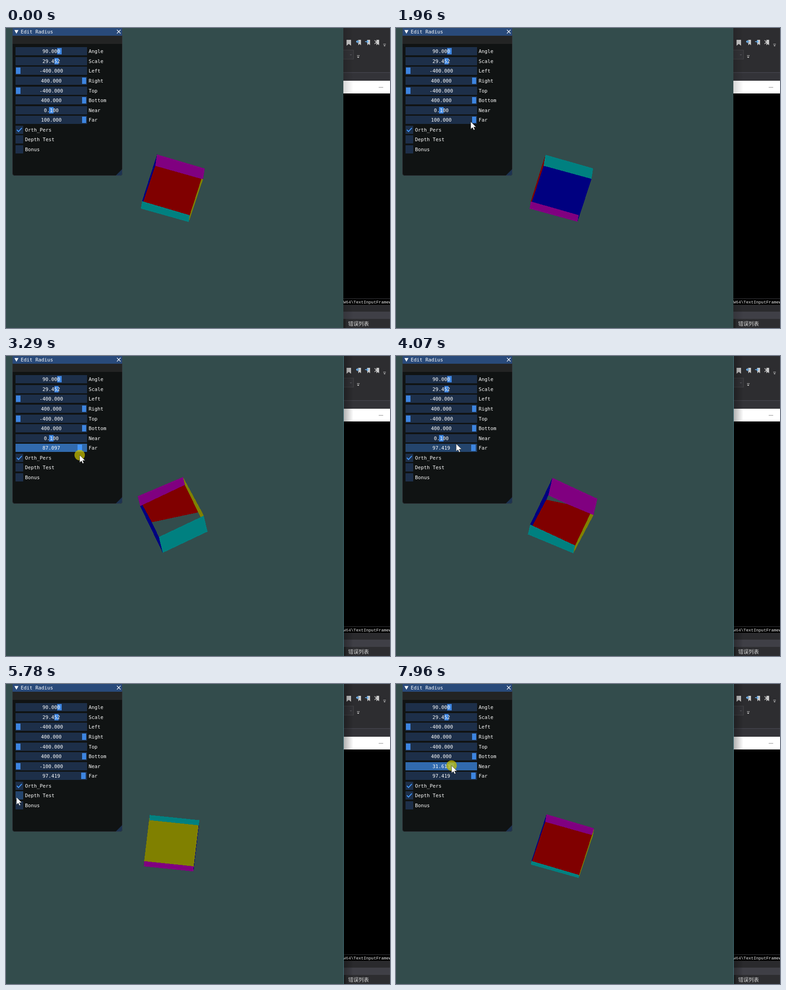
An HTML page for the animation above (8000 ms loop, 848 by 660 pixels).

```html
<!DOCTYPE html>
<html lang="en">
<head>
<meta charset="utf-8">
<title>Cube viewer</title>
<style>
  html, body { margin: 0; width: 100%; height: 100%; overflow: hidden; background: #334c4c; }
  svg { display: block; width: 848px; height: 660px; }
  text { white-space: pre; }
  .ui text { font: 10.8px "DejaVu Sans Mono", monospace; fill: #fff; }
  .cube, .ui rect { shape-rendering: crispEdges; }
</style>
</head>
<body>
<svg id="stage" viewBox="0 0 848 660">
  <defs>
    <linearGradient id="shade">
      <stop offset="0" stop-opacity=".4"/>
      <stop offset="1" stop-opacity="0"/>
    </linearGradient>
  </defs>
  <rect width="848" height="660" fill="#334c4c"/>
  <g class="cube" id="cube"></g>

  <g id="editor">
    <rect x="745" width="103" height="660" fill="#2d2d30"/>
    <g fill="#c8c8c8">
      <path d="M752 26h10v13l-5-4-5 4z"/>
      <path d="M778 26h6v12l-3-3-3 3zM798 26h6v12l-3-3-3 3zM818 26h6v12l-3-3-3 3z"/>
      <path d="M833 35h6v1h-6zM833.500 38h5l-2.500 2.500zM775 60h6v1h-6zM775 63h5.500l-2.700 3z"/>
    </g>
    <g fill="none" stroke="#75beff" stroke-width="1.600">
      <path d="M781 30h-7m3-3l-3 3 3 3M793 30h7m-3-3l3 3-3 3"/>
      <path d="M814 27l9 9m-9-1l6-6" stroke="#c8c8c8"/>
    </g>
    <path d="M745 48.500h22.500v20h-22.500" fill="#333337" stroke="#434346"/>
    <path d="M759 58h5l-2.500 2.500z" fill="#55555a"/>
    <rect x="745" y="97" width="103" height="2" fill="#3f3f46"/>
    <rect x="745" y="99" width="103" height="17" fill="#333338"/>
    <rect x="745" y="116" width="103" height="28" fill="#fff"/>
    <path d="M823 130.500h10" stroke="#8a8a8a"/>
    <rect x="745" y="144" width="103" height="465" fill="#000"/>
    <path d="M745 595.500h103" stroke="#3a3a3e"/>
    <text x="745" y="605.500" fill="#f2f2f2" style="font:9.300px 'Liberation Mono',monospace">W64\TextInputFramework</text>
    <rect x="745" y="609" width="103" height="15" fill="#2a2a2d"/>
    <rect x="745" y="624" width="103" height="16" fill="#3f3f46"/>
    <rect x="745" y="640" width="5" height="20" fill="#252526"/>
    <text x="755.500" y="654.500" fill="#d8d8d8" style="font:11.500px 'Noto Sans CJK SC','Noto Sans CJK',sans-serif">错误列表</text>
    <rect id="shadow" x="745" width="22" height="660" fill="url(#shade)"/>
    <path id="border" d="M745.500 0v660" stroke="#4b7c86"/>
  </g>

  <g class="ui" id="ui">
    <path d="M14 0H257V319q0 6-6 6H20q-6 0-6-6z" fill="#101313"/>
    <rect x="14" width="243" height="17" fill="#294a7a"/>
    <rect x="14" y="17" width="243" height="18" fill="#232424"/>
    <path d="M18.500 4.500h9l-4.500 8z" fill="#fff"/>
    <text x="32.500" y="12.300">Edit Radius</text>
    <path d="M245 4l8 8m0-8l-8 8" stroke="#fff" stroke-width="1.200"/>
    <path d="M257 310v9q0 6-6 6h-9z" fill="#1c3351"/>
    <path d="M14.500 0V319q0 5.500 5.500 5.500H251q5.500 0 5.500-5.500V0" fill="none" stroke="#3e3f47" opacity=".6"/>
  </g>

  <g id="mouse">
    <circle id="press" r="11.500" fill="#c8c000" opacity=".72"/>
    <path id="arrow" d="M0 0V16.500l3.900-3.600 2.700 5.600 2.600-1.200-2.600-5.400h5.400z" fill="#fff" stroke="#222" stroke-width=".7"/>
    <path id="resize" d="M-10 0l5-4.500v3.500h10v-3.500l5 4.500-5 4.500v-3.500h-10v3.500z" fill="#fff" stroke="#222" stroke-width=".8"/>
  </g>
</svg>
<script>
const $ = id => document.getElementById(id);
const LOOP = 8000;

function make(parent, tag, attrs, text) {
  const el = document.createElementNS("http://www.w3.org/2000/svg", tag);
  set(el, attrs);
  if (text) el.textContent = text;
  return parent.appendChild(el);
}
function set(el, attrs) {
  for (const k in attrs) el.setAttribute(k, attrs[k]);
}
const show = (el, on) => el.setAttribute("visibility", on ? "visible" : "hidden");

// ---- cube ----
const HALF = 58.2, DEPTH = 20, KX = 0.947, KY = 0.883;
const faces = [[2, -1, "#800000"], [2, 1, "#008000"], [0, -1, "#000080"],
  [0, 1, "#808000"], [1, -1, "#008080"], [1, 1, "#800080"]];
const polys = faces.map(() => make($("cube"), "polygon", {}));

// Two turns per loop, with a slight lead in the middle.
const spin = t => -23.9 - 720 * t / 7960 - 2.9 * Math.sin(Math.PI * t / 7960);

// Keeps the part of a polygon where side(p) >= 0.
function clip(pts, side) {
  const out = [];
  pts.forEach((p, i) => {
    const q = pts[(i + 1) % pts.length], a = side(p), b = side(q);
    if (a >= 0) out.push(p);
    if (a * b < 0) out.push(p.map((v, j) => v + (q[j] - v) * a / (a - b)));
  });
  return out;
}

function drawCube(deg, near, far, depthTest) {
  const r = deg * Math.PI / 180, c = Math.cos(r), q = Math.sin(r) / Math.SQRT2;
  const p = (1 + c) / 2, m = (1 - c) / 2;
  const axes = [[p, q, m], [-q, c, q], [m, -q, p]];   // rotation about (1,0,1)
  const cx = 367.3 + 1.7 * c, cy = 350.3;
  const list = faces.map(([axis, sign, fill]) => {
    const u = axes[(axis + 1) % 3], v = axes[(axis + 2) % 3], n = axes[axis];
    const quad = [[-1, -1], [1, -1], [1, 1], [-1, 1]].map(([a, b]) => {
      const w = n.map((k, i) => HALF * (k * sign + u[i] * a + v[i] * b));
      return [cx + w[0] * KX, cy - w[1] * KY, DEPTH - w[2]];
    });
    const cut = clip(clip(quad, k => k[2] - near), k => far - k[2]);
    return { fill, z: n[2] * sign, points: cut.map(k => k[0].toFixed(1) + "," + k[1].toFixed(1)).join(" ") };
  });
  if (depthTest) list.sort((a, b) => a.z - b.z);
  list.forEach(({ fill, points }, i) => set(polys[i], { fill, points }));
}

// ---- panel ----
const rowY = i => Math.round(51.2 + 21.58 * i);
const BASE = "#1d2f49", HOVER = "#24456d", ACTIVE = "#316aad";
const NEAR = 6, FAR = 7;
const ui = $("ui");

// Name, value, position of the grab from 0 to 1
const sliders = [["Angle", 90, 0.625], ["Scale", 29.452, 0.58], ["Left", -400, 0], ["Right", 400, 1],
  ["Top", -400, 0], ["Bottom", 400, 1], ["Near", 0.1, 0.5], ["Far", 100, 1]].map(([name, value, part], i) => {
  const y = rowY(i);
  const bar = make(ui, "rect", { x: 21, y: y - 9, width: 158, height: 18, fill: BASE });
  const grab = make(ui, "rect", { y: y - 7, width: 9.6, height: 14, fill: "#3d85e0" });
  const label = make(ui, "text", { x: 100, y: y + 4, "text-anchor": "middle" });
  make(ui, "text", { x: 182.5, y: y + 4 }, name);
  const slide = (v, k) => {
    label.textContent = v.toFixed(3);
    grab.setAttribute("x", 22.4 + 145.4 * k);
  };
  slide(value, part);
  return { bar, grab, slide };
});
const boxes = ["Orth_Pers", "Depth Test", "Bonus"].map((name, i) => {
  const y = rowY(8 + i);
  const bar = make(ui, "rect", { x: 21, y: y - 9, width: 17, height: 18, fill: BASE });
  const mark = make(ui, "path", { d: `M24 ${y}l3.600 3.700 7.400-7.800`, fill: "none", stroke: "#4296fa", "stroke-width": 2 });
  make(ui, "text", { x: 42, y: y + 4 }, name);
  show(mark, i === 0);
  return { bar, mark };
});

// Dragging moves in whole steps over a range of -100 to 100.
function valueAt(x) {
  const v = (Math.floor((x - 100) / 72 * 77.5) + 0.5) / 77.5 * 100;
  return Math.max(-100, Math.min(100, v));
}

// ---- pointer ----
// Waypoints: [time, x, y]
const path = [[70, 565, 600], [640, 15, 92], [820, 15, 95], [1800, 172, 222], [1960, 165, 206],
  [2300, 172, 206], [2800, 150, 217], [3290, 162.6, 218], [3600, 180, 212], [4400, 100, 180],
  [4840, 52, 177.5], [5300, 13, 177], [5500, 18, 185], [5780, 23, 249], [6410, 24, 247],
  [7020, 15, 190], [7330, 28, 181], [7960, 122.7, 179.5]];
// [down, up, slider]
const presses = [[2250, 3700, FAR], [4350, 5500, NEAR], [5950, 6060, -1], [7330, LOOP, NEAR]];
const CHECKED = 6060, FOCUS = 2250;

function pointer(t) {
  const i = path.findIndex(k => k[0] >= t);
  if (i < 1) return path[i ? path.length - 1 : 0].slice(1);
  const [t0, x0, y0] = path[i - 1], [t1, x1, y1] = path[i], u = (t - t0) / (t1 - t0);
  return [x0 + (x1 - x0) * u, y0 + (y1 - y0) * u];
}

function draw(t) {
  const [x, y] = pointer(t);
  const press = presses.find(([a, b]) => t >= a && t < b);
  const active = press ? press[2] : -1;

  const range = { [NEAR]: 0.1, [FAR]: 100 };
  for (const [a, b, id] of presses) {
    if (t >= a && id >= 0) range[id] = valueAt(pointer(Math.min(t, b))[0]);
  }
  for (const id in range) sliders[id].slide(range[id], (range[id] + 100) / 200);

  const [hx, hy] = pointer(t - 80);   // hover trails the pointer
  const over = (row, w) => !press && hx > 20 && hx < 20 + w && Math.abs(hy - rowY(row)) < 9;
  sliders.forEach(({ bar, grab }, i) => {
    bar.setAttribute("fill", i === active ? ACTIVE : over(i, 159) ? HOVER : BASE);
    grab.setAttribute("fill", i === active ? "#4296fa" : "#3d85e0");
  });
  boxes.forEach(({ bar }, i) => {
    const hit = x > 20 && x < 100 && Math.abs(y - rowY(8 + i)) < 9;
    bar.setAttribute("fill", hit && active < 0 ? (press ? ACTIVE : HOVER) : BASE);
  });
  const depthTest = t >= CHECKED;
  show(boxes[1].mark, depthTest);
  show($("border"), t >= FOCUS);
  $("shadow").setAttribute("opacity", t >= FOCUS ? 0.8 : 0.4);

  drawCube(spin(t), range[NEAR], range[FAR], depthTest);

  const edge = !press && Math.abs(x - 14) < 4 && y < 325, seen = t >= 70;
  $("mouse").setAttribute("transform", `translate(${x.toFixed(1)} ${y.toFixed(1)})`);
  show($("press"), seen && press);
  show($("arrow"), seen && !edge);
  show($("resize"), seen && edge);
}

const start = performance.now();
function loop() {
  draw((performance.now() - start) % LOOP);
  requestAnimationFrame(loop);
}
loop();
</script>
</body>
</html>
```
